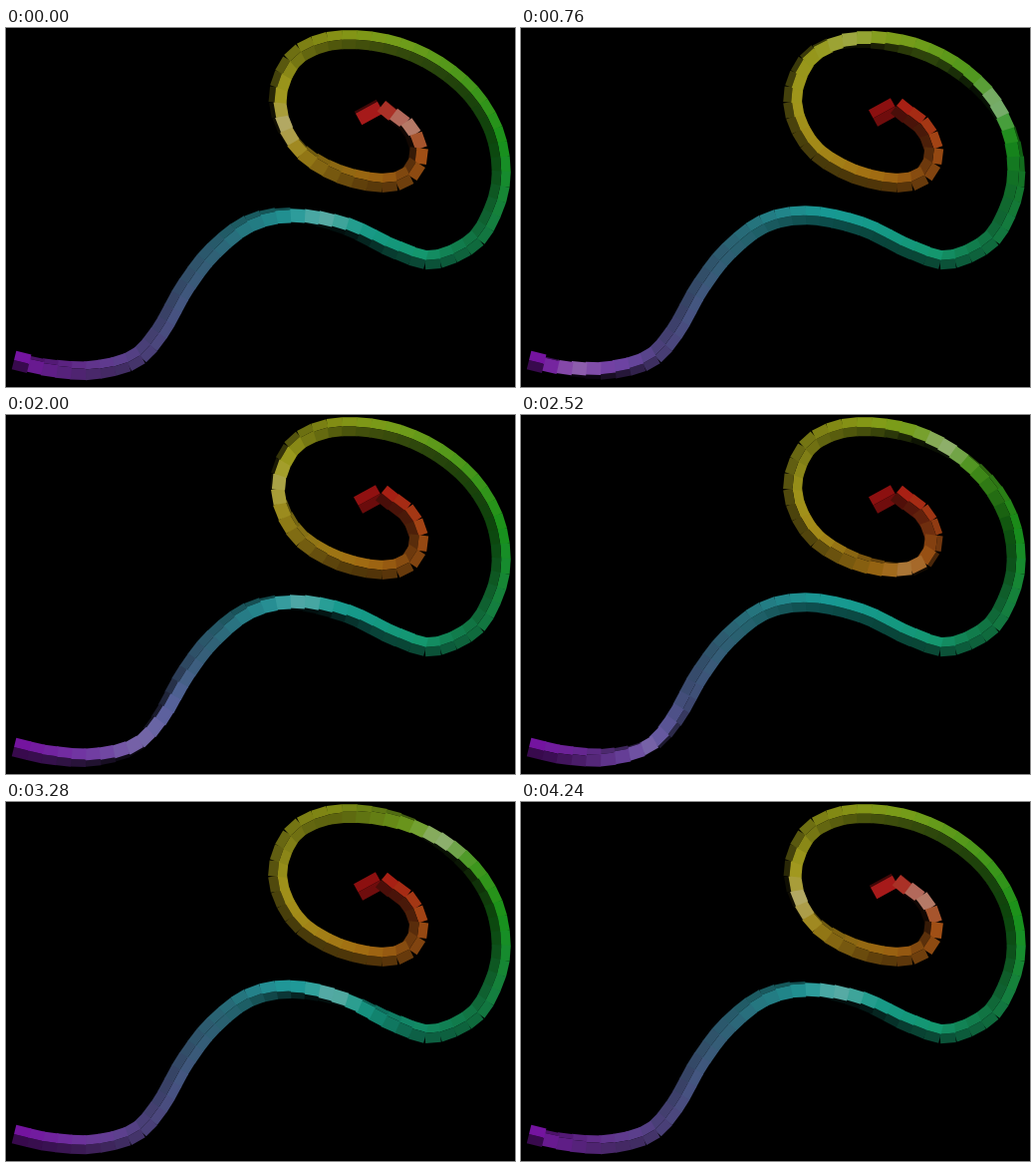
An HTML page with a canvas that plays this animation: 511x360 px, repeating every 4280 ms.

```html
<!DOCTYPE html>
<html>
<head>
<meta charset="utf-8">
<style>
html, body { margin: 0; width: 100%; height: 100%; overflow: hidden; background: #000; }
canvas { display: block; }
</style>
</head>
<body>
<canvas id="stage" width="511" height="360"></canvas>
<script>
const ctx = document.getElementById('stage').getContext('2d');
const LOOP = 4280, CYCLE = 4240, FRAME = 40;
const HALF = 6.7, STEP = 14.4, DELAY = 33.5;
const LIGHT = [0.3, -0.3, 0.905], SHINE = [0.155, -0.155, 0.976];

// Spine of the chain, from the inner end of the spiral to the tail.
const spine = [
  [383, 83], [405, 101], [414, 126], [403, 148], [376, 155], [334, 146], [297, 124], [277, 93],
  [274, 62], [289, 31], [318, 15], [355, 12], [397, 20], [436, 39], [469, 68], [490, 104],
  [497, 144], [490, 180], [469, 214], [429, 232], [391, 222], [342, 199], [289, 188], [245, 196],
  [208, 224], [180, 260], [154, 305], [128, 332], [87, 343], [45, 341], [12, 334]
];
const palette = [
  [170, 20, 20], [160, 78, 20], [162, 108, 18], [162, 136, 24], [160, 154, 28], [146, 156, 22],
  [112, 156, 26], [72, 150, 26], [24, 146, 26], [24, 150, 72], [20, 150, 100], [20, 152, 130],
  [24, 154, 150], [46, 142, 154], [74, 112, 152], [96, 90, 160], [112, 60, 162], [116, 20, 160]
];

const dot = (a, b) => a[0] * b[0] + a[1] * b[1] + a[2] * b[2];
const mix = (a, b, k) => a + (b - a) * k;
const mod = (a, n) => ((a % n) + n) % n;
const ease = k => { k = Math.min(1, Math.max(0, k)); return k * k * (3 - 2 * k); };

function spinePoint(u) {
  const i = Math.min(Math.floor(u), spine.length - 2), k = u - i;
  const at = j => spine[Math.min(spine.length - 1, Math.max(0, j))];
  const [a, b, c, d] = [at(i - 1), at(i), at(i + 1), at(i + 2)];
  return [0, 1].map(n => 0.5 * (2 * b[n] + (c[n] - a[n]) * k
    + (2 * a[n] - 5 * b[n] + 4 * c[n] - d[n]) * k * k
    + (3 * b[n] - a[n] - 3 * c[n] + d[n]) * k * k * k));
}

function buildChain() {
  const chain = [{ x: 364.5, y: 84.5, turn: -0.5, length: 25 }];
  let last = spinePoint(0), walked = STEP;
  for (let u = 0; u < spine.length - 1; u += 0.004) {
    const p = spinePoint(u), q = spinePoint(u + 0.004);
    walked += Math.hypot(p[0] - last[0], p[1] - last[1]);
    last = p;
    if (walked >= STEP) {
      walked -= STEP;
      chain.push({ x: p[0], y: p[1], turn: Math.atan2(q[1] - p[1], q[0] - p[0]), length: 15.6 });
    }
  }
  chain.forEach((box, i) => {
    const c = i / (chain.length - 1) * (palette.length - 1);
    const n = Math.min(Math.floor(c), palette.length - 2);
    box.color = palette[n].map((v, j) => mix(v, palette[n + 1][j], c - n));
  });
  return chain;
}

// Quarter turns that start at the head and run down the chain.
const turns = [[1000, 600, 1], [1840, 600, -1], [3320, 560, 1], [3800, 520, -1]];
function twist(time) {
  const s = mod(time - 400, CYCLE);
  const quarters = turns.reduce((sum, [mid, span, dir]) => sum + dir * ease((s - mid) / span + 0.5), 0);
  return (0.5 + quarters) * Math.PI / 2;
}

function drawBox(box, angle) {
  const sx = Math.sin(box.turn), sy = -Math.cos(box.turn);
  ctx.save();
  ctx.translate(box.x, box.y);
  ctx.rotate(box.turn);
  for (let k = 0; k < 4; k++) {
    const a = angle + k * Math.PI / 2, out = Math.sin(a), front = Math.cos(a);
    if (front < 0.01) continue;
    const normal = [sx * out, sy * out, front];
    const lit = 0.1 + Math.max(0, dot(normal, LIGHT));
    const gloss = 0.5 * Math.max(0, dot(normal, SHINE)) ** 50;
    const rgb = box.color.map(v => Math.round(mix(v * Math.min(1, lit), 200, gloss)));
    ctx.fillStyle = `rgb(${rgb})`;
    ctx.fillRect(-box.length / 2, -HALF * (out + front), box.length, 2 * HALF * front);
  }
  ctx.restore();
}

const chain = buildChain();
const start = performance.now();
function draw() {
  const elapsed = (performance.now() - start) % LOOP;
  const time = Math.floor(elapsed / FRAME) * FRAME % CYCLE;
  ctx.fillStyle = '#000';
  ctx.fillRect(0, 0, 511, 360);
  chain.forEach((box, i) =>
    drawBox(box, i === chain.length - 1 ? Math.PI / 4 : twist(time - i * DELAY)));
  requestAnimationFrame(draw);
}
draw();
</script>
</body>
</html>
```
